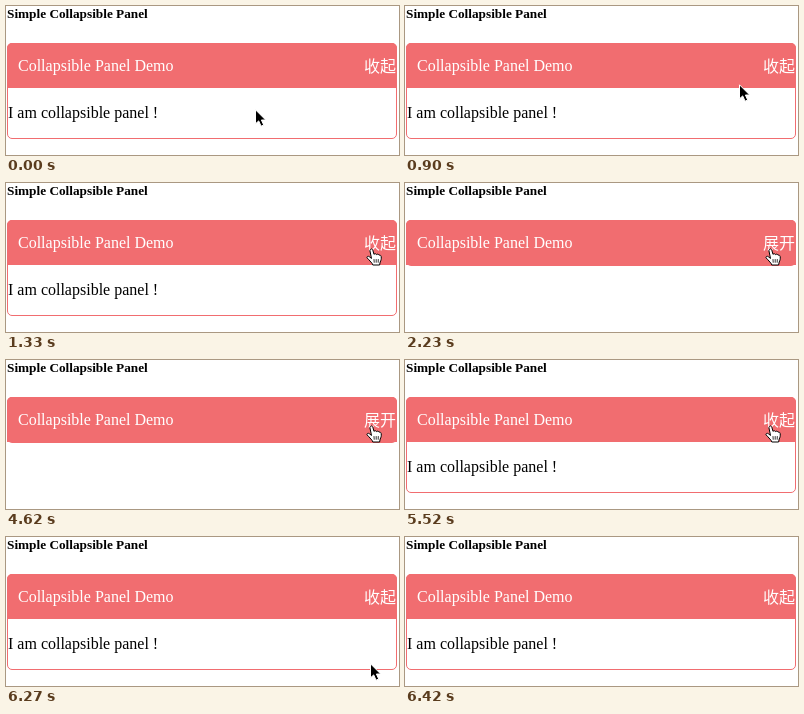
These frames come from a looping animation (393 px wide and 149 px high, 7.28 s). An HTML page:

```html
<!DOCTYPE html>
<html lang="en">
<head>
<meta charset="utf-8">
<title>Collapsible panel</title>
<style>
  html, body { margin: 0; width: 100%; height: 100%; overflow: hidden; background: #fff; }
  svg { display: block; }
  text { font: 16px "Liberation Serif", "Noto Sans CJK SC", "Noto Sans CJK", serif; }
  .title { font-weight: bold; font-size: 13.28px; }
  .light { fill: #fff; }
  .pink { fill: #f16d70; }
</style>
</head>
<body>
<svg width="393" height="149" viewBox="0 0 393 149">
  <text class="title" x="1" y="12">Simple Collapsible Panel</text>
  <path class="pink" d="M1 82V42a5 5 0 0 1 5-5H386a5 5 0 0 1 5 5V82z"/>
  <rect id="frame" x="1.5" y="37.5" width="389" height="95" rx="4.5" fill="none" stroke="#f16d70"/>
  <rect id="folded" class="pink" x="1" y="37" width="390" height="46" rx="5"/>
  <text class="light" x="12" y="65">Collapsible Panel Demo</text>
  <text id="label" class="light" x="358" y="66" lang="zh-CN"></text>
  <text id="content" x="2" y="112">I am collapsible panel !</text>
  <g id="arrow">
    <path d="M1.5 .8V14.8L4.7 11.9L7.1 17.2L9.7 16L7.4 11H11.7z" fill="#000" stroke="#fff" stroke-linejoin="round"/>
  </g>
  <g id="hand" stroke="#000" stroke-linecap="round" stroke-linejoin="round">
    <path fill="#fff" d="M4 2.3C4.4.5 6.4.5 6.8 2.2L8 6.4C8.6 5.4 10.2 5.6 10.6 6.6C11.4 5.8 12.8 6.2 13 7.2C14 6.8 15 7.4 15.2 8.6C15.5 11 15 12.5 14.2 14L13.6 17H6.8C6.4 15.4 5.2 14.4 4 13C3 11.6 1.6 10.6 1 9.8C.6 8.4 2.4 7.8 3.4 8.8L5.2 10.2z"/>
    <path fill="none" stroke-width=".8" d="M8 11.5L8.2 14.3M10.2 11.5V14.3M12.3 11.5L12.2 14.3"/>
  </g>
</svg>
<script>
  const LOOP = 7280;
  const el = id => document.getElementById(id);
  const show = (id, on) => el(id).setAttribute("visibility", on ? "visible" : "hidden");

  // [start ms, pointer, x, y]
  const pointerSteps = [
    [0, "arrow", 248, 103],
    [750, "arrow", 297, 90],
    [900, "arrow", 333, 78],
    [1040, "hand", 352, 66],
    [1180, "hand", 360, 66],
    [1330, "hand", 360, 65],
    [6270, "arrow", 363, 126],
    [6420, "none", 0, 0]
  ];
  // [start ms, panel is open]
  const panelSteps = [[0, true], [2230, false], [3430, true], [4620, false], [5520, true]];

  const stepAt = (steps, t) => steps.filter(s => s[0] <= t).pop();

  function draw(t) {
    const [, open] = stepAt(panelSteps, t);
    show("frame", open);
    show("content", open);
    show("folded", !open);
    el("label").textContent = open ? "收起" : "展开";

    const [, pointer, x, y] = stepAt(pointerSteps, t);
    for (const id of ["arrow", "hand"]) {
      show(id, id === pointer);
      el(id).setAttribute("transform", `translate(${x} ${y})`);
    }
  }

  const start = performance.now();
  function tick() {
    draw((performance.now() - start) % LOOP);
    requestAnimationFrame(tick);
  }
  tick();
</script>
</body>
</html>
```
